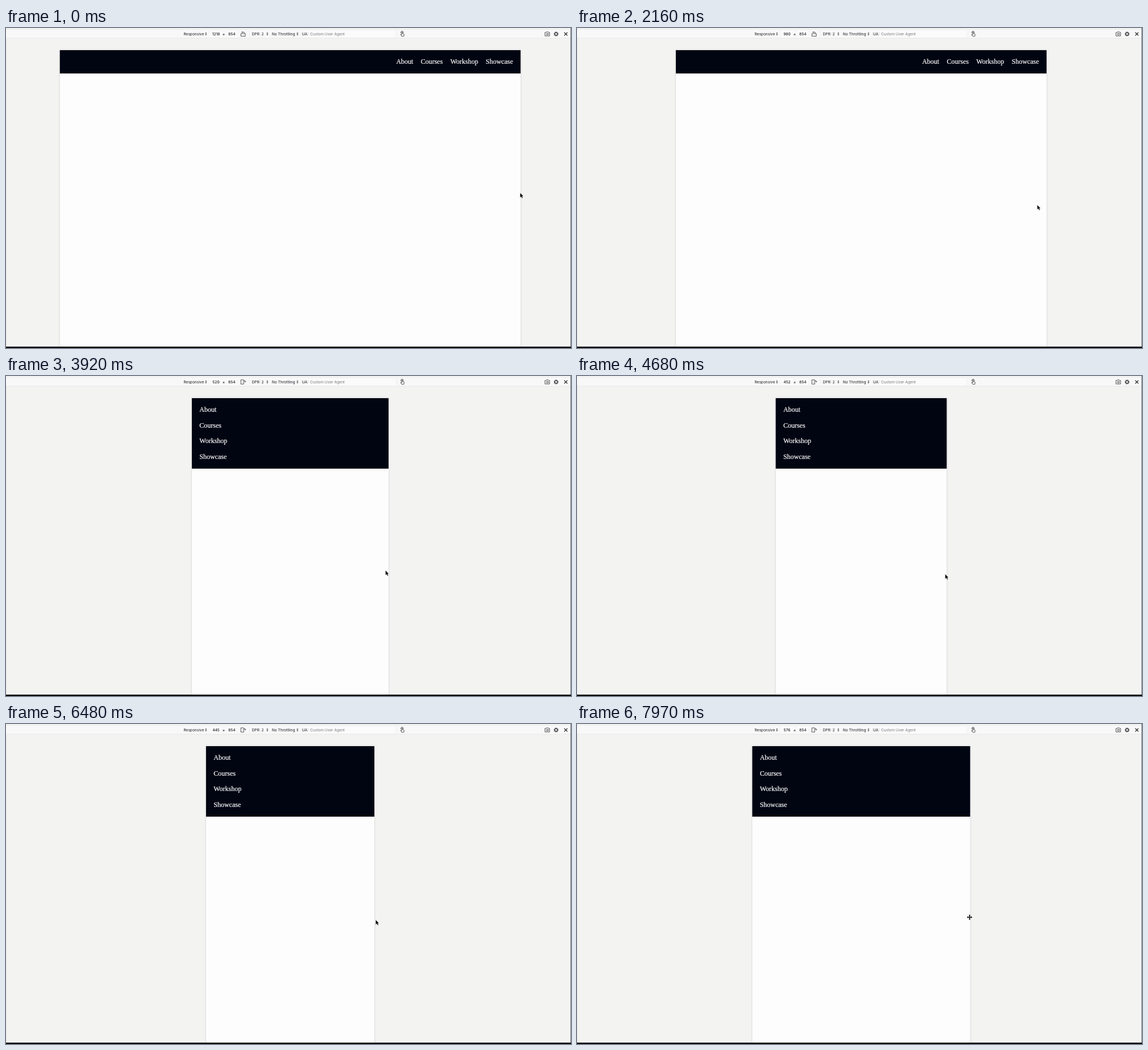
Animation of 994 by 563 pixels, one loop 8 s. Source, as an HTML page:

```html
<!DOCTYPE html>
<html lang="en">
<head>
<meta charset="utf-8">
<title>Responsive navigation</title>
<style>
  html, body { margin: 0; width: 100%; height: 100%; overflow: hidden; background: #f3f3f2; }
  svg { display: block; width: 100vw; height: 100vh; }
  .bar text { font: 6.6px Inter, sans-serif; fill: #1c1c20; }
  .bar .size { font-weight: 500; text-anchor: middle; }
  .bar .hint { fill: #77777b; }
  .links text { font: 12px "Liberation Serif", serif; fill: #fff; stroke: #fff; stroke-width: .2; }
  .icon { fill: none; stroke: #29292d; stroke-width: .8; stroke-linecap: round; stroke-linejoin: round; }
  .page { filter: drop-shadow(0 0 1.5px rgba(0, 0, 30, .18)); }
</style>
</head>
<body>
<svg viewBox="0 0 994 563">
  <defs>
    <path id="stepper" d="M-1.5-.6 0-2.6 1.5-.6zM-1.5.6 0 2.6 1.5.6z" fill="#29292d"/>
  </defs>
  <rect width="994" height="563" fill="#f3f3f2"/>

  <rect id="page" class="page" y="39" height="530" fill="#fdfdfd"/>
  <rect id="nav" y="39" fill="#010512"/>
  <g class="links" id="links">
    <text>About</text><text>Courses</text><text>Workshop</text><text>Showcase</text>
  </g>

  <g class="bar">
    <rect width="994" height="18" fill="#f8f8f9"/>
    <path d="M0 1.8H994M0 18H994" stroke="#e2e2e4" stroke-width=".8"/>
    <g fill="#fbfbfc">
      <rect x="360" y="5" width="20" height="11"/>
      <rect x="388" y="5" width="18" height="11"/>
      <rect x="533" y="5" width="151" height="11"/>
    </g>
    <path d="M428.5 4V16M687.5 4V16" stroke="#ededf0" stroke-width=".8"/>
    <text x="312.4" y="12.8">Responsive</text>
    <text id="width" class="size" x="369.5" y="12.8"></text>
    <text class="size" x="383" y="12.8">×</text>
    <text class="size" x="397.3" y="12.8">854</text>
    <text x="432.6" y="12.8">DPR: 2</text>
    <text x="467.8" y="12.8">No Throttling</text>
    <text x="520.7" y="12.8">UA:</text>
    <text class="hint" x="535" y="12.8">Custom User Agent</text>
    <use href="#stepper" x="351.8" y="10.4"/>
    <use href="#stepper" x="459.8" y="10.4"/>
    <use href="#stepper" x="512.8" y="10.4"/>
    <path id="landscape" class="icon" d="M413.6 9.9H421V14.4H413.6ZM415 7.4H418.4Q419.6 7.4 419.6 8.4M415.8 6.6 415 7.4 415.8 8.2"/>
    <path id="portrait" class="icon" d="M413.6 6.8H418.2V14.2H413.6ZM419.4 8.3H420.3Q421 8.3 421 9.2V10.6M420.2 9.9 421 10.7 421.7 9.9"/>
    <path class="icon" d="M696 11.6V7.4Q696.8 6.5 697.6 7.4V9.8L700 10.4Q700.6 10.7 700.4 11.6L699.8 14.6H696.4L694.2 11.8Q694.4 10.7 696 11.6M694.7 8.6A2.3 2.3 0 1 1 699 8.6"/>
    <g class="icon">
      <path d="M948.6 7.8H950.3L951 6.8H953.8L954.5 7.8H956.3V14H948.6Z"/>
      <circle cx="952.4" cy="10.8" r="1.6"/>
      <circle cx="967.8" cy="10.5" r="2.4" stroke-width="1.2"/>
      <circle cx="967.8" cy="10.5" r="3.6" stroke-dasharray="1.2 1.627" stroke-width="1.2" stroke-linecap="butt"/>
      <path d="M982.4 8 987.4 13M987.4 8 982.4 13" stroke-width="1.1"/>
    </g>
  </g>

  <path d="M.4 18V561" stroke="#dedede" stroke-width=".8"/>
  <path d="M993.6 0V563" stroke="#4a4a4e" stroke-width=".8"/>
  <rect y="560.6" width="994" height="2.4" fill="#050507"/>

  <path id="arrow" d="M0 0V8.4L2 6.7 3.4 9.6 4.9 8.9 3.6 6.1H6Z" stroke="#fff" stroke-width=".4"/>
  <g id="cross">
    <path d="M-4 0H4M0-4V4" stroke="#fff" stroke-width="2.6"/>
    <path d="M-3.5 0H3.5M0-3.5V3.5" stroke="#000" stroke-width="1.3"/>
    <path d="M-4.8 0-2.8-1.8V1.8ZM4.8 0 2.8-1.8V1.8ZM0-4.8-1.8-2.8H1.8ZM0 4.8-1.8 2.8H1.8Z"/>
  </g>
</svg>
<script>
  const LOOP = 8000, SCALE = 0.6655, CENTER = 500, GAP = 13.3, LINE = 27.6;
  const BREAKPOINT = 600, VIEW_HEIGHT = 854;
  const POINTER_LEAD = 110, REFLOW = 100, REFLOW_PHASE = 40;

  // Viewport width over time, joined by a smooth monotone curve
  const keys = [
    [0, 1218], [850, 1227], [1630, 1115], [2160, 980], [2490, 832], [3260, 618],
    [4680, 452], [5500, 428], [6480, 445], [7100, 545], [7970, 576]
  ];
  const slopes = keys.slice(1).map(([t, w], i) => (w - keys[i][1]) / (t - keys[i][0]));
  const tangents = keys.map((_, i) => {
    const a = slopes[i - 1] || 0, b = slopes[i] || 0;
    return a * b > 0 ? 2 * a * b / (a + b) : 0;
  });

  function widthAt(time) {
    const t = Math.max(0, Math.min(time, keys.at(-1)[0]));
    const i = Math.max(1, keys.findIndex(([end]) => end >= t));
    const [t0, w0] = keys[i - 1], [t1, w1] = keys[i];
    const span = t1 - t0, k = (t - t0) / span, r = 1 - k;
    return w0 * r * r * (1 + 2 * k) + w1 * k * k * (1 + 2 * r)
      + span * k * r * (tangents[i - 1] * r - tangents[i] * k);
  }

  function smooth(from, to, t) {
    const k = Math.max(0, Math.min(1, (t - from) / (to - from)));
    return k * k * (3 - 2 * k);
  }

  const el = id => document.getElementById(id);
  const links = [...el("links").children];
  const set = (node, attrs) => {
    for (const name in attrs) node.setAttribute(name, attrs[name]);
  };
  const show = (node, on) => node.setAttribute("visibility", on ? "visible" : "hidden");

  function placeLinks(left, contentRight, stacked) {
    let x = contentRight - GAP;
    for (let i = links.length - 1; i >= 0; i--) {
      x -= links[i].getComputedTextLength();
      set(links[i], { x: stacked ? left + GAP : x, y: 63 + (stacked ? i * LINE : 0) });
      x -= GAP;
    }
  }

  function draw(t) {
    const width = Math.round(widthAt(t));
    const size = width * SCALE, left = CENTER - size / 2;
    // The page content reflows a little later than its frame resizes
    const contentWidth = widthAt(t - (t + REFLOW_PHASE) % REFLOW);
    const stacked = contentWidth <= BREAKPOINT;

    set(el("page"), { x: left, width: size });
    set(el("nav"), { x: left, width: size, height: stacked ? 124 : 41 });
    placeLinks(left, left + contentWidth * SCALE, stacked);

    el("width").textContent = width;
    show(el("landscape"), width > VIEW_HEIGHT);
    show(el("portrait"), width <= VIEW_HEIGHT);

    const x = CENTER + widthAt(t + POINTER_LEAD) * SCALE / 2 - 1;
    const y = 290 + 59 * smooth(300, 4900, t) - 9 * smooth(5000, LOOP, t);
    const onGrip = (t > 3000 && t < 3900) || t > 6900;
    const transform = `translate(${x} ${y})`;
    set(el("arrow"), { transform });
    set(el("cross"), { transform });
    show(el("arrow"), !onGrip);
    show(el("cross"), onGrip);
  }

  const start = performance.now();
  function tick() {
    draw((performance.now() - start) % LOOP);
    requestAnimationFrame(tick);
  }
  tick();
</script>
</body>
</html>
```
